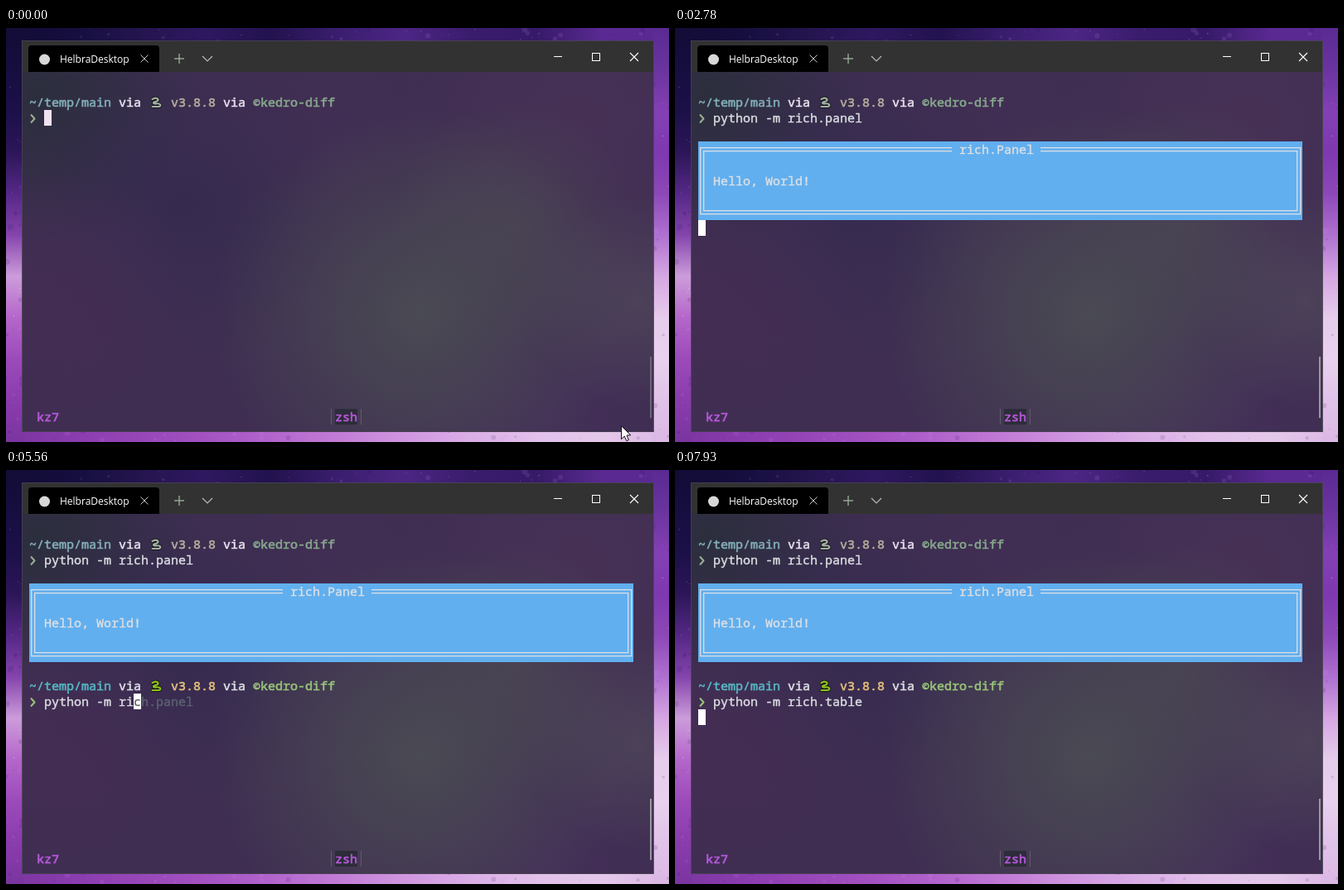
Animation, 800 px wide and 500 px high, one loop 8 s. Source, as an HTML page with a canvas:

```html
<!DOCTYPE html>
<html lang="en">
<head>
<meta charset="utf-8">
<title>Terminal session</title>
<style>
  html, body { margin: 0; width: 100%; height: 100%; overflow: hidden; background: #1a1040; }
  canvas { display: block; width: 800px; height: 500px; }
</style>
</head>
<body>
<canvas id="stage" width="800" height="500"></canvas>
<script>
const LOOP = 8000, CELL = 9, ROW = 19, LEFT = 28, TOP = 80;
const MONO = '"Noto Sans Mono", "DejaVu Sans Mono", monospace';
const UI = '"Open Sans", "Noto Sans", sans-serif';
const TEXT = '#dcdfe4', GHOST = '#5c6370';
const FADED = { dir: '#82aeb8', via: '#e9dfee', ver: '#b7ae9c', env: '#86a88c', arrow: '#98ae92', snake: '#a3b0a2' };
const VIVID = { dir: '#56b6c2', via: '#dcdfe4', ver: '#e5c07b', env: '#98c379', arrow: '#98c379', snake: '#8fbf1d' };

const ctx = document.getElementById('stage').getContext('2d');
const colX = c => LEFT + c * CELL;
const rowY = r => TOP + r * ROW;

function rect(g, x, y, w, h, color) {
  g.fillStyle = color;
  g.fillRect(x, y, w, h);
}

function line(g, color, width, ...pts) {
  g.strokeStyle = color;
  g.lineWidth = width;
  g.beginPath();
  pts.forEach(([x, y], i) => i ? g.lineTo(x, y) : g.moveTo(x, y));
  g.stroke();
}

// Text on the character grid; the thin outline gives a medium weight
function put(g, str, col, row, color, heft = 0.4) {
  g.font = `15px ${MONO}`;
  g.fillStyle = g.strokeStyle = color;
  g.lineWidth = heft;
  g.lineJoin = 'round';
  [...str].forEach((ch, i) => {
    g.fillText(ch, colX(col + i), rowY(row) + 15);
    g.strokeText(ch, colX(col + i), rowY(row) + 15);
  });
}

function block(col, row, color = '#ffffff') {
  rect(ctx, colX(col), rowY(row), CELL, ROW, color);
}

function seeded(seed) {
  return () => (seed = (seed * 16807) % 2147483647) / 2147483647;
}

function strip(g, x, y, w, h, colors) {
  const grad = w > h ? g.createLinearGradient(x, 0, x + w, 0) : g.createLinearGradient(0, y, 0, y + h);
  colors.forEach((c, i) => grad.addColorStop(i / (colors.length - 1), c));
  rect(g, x, y, w, h, grad);
}

function glow(g, x, y, r, rgb, alpha) {
  const grad = g.createRadialGradient(x, y, 0, x, y, r);
  grad.addColorStop(0, `rgba(${rgb},${alpha})`);
  grad.addColorStop(0.5, `rgba(${rgb},${alpha * 0.55})`);
  grad.addColorStop(1, `rgba(${rgb},0)`);
  rect(g, x - r, y - r, 2 * r, 2 * r, grad);
}

function wallpaper(g) {
  strip(g, 0, 0, 800, 20, ['#120c36', '#150e3e', '#24144e', '#2e1860', '#22124e',
    '#3a1e6e', '#4c2684', '#3a1c6c', '#361a68', '#5a2a92', '#5a2a92']);
  strip(g, 0, 484, 800, 16, ['#7a35a0', '#8a3cae', '#9746b8', '#a452c2', '#b264cc',
    '#c27cd6', '#d096e0', '#daaee6', '#e2c0ea', '#e4c8ea', '#dcb8e4']);
  strip(g, 0, 0, 21, 500, ['#120c36', '#170e40', '#1c1048', '#2c1658', '#552886',
    '#8444ac', '#cc9cda', '#b466ca', '#9c4aba', '#8a3cac', '#7a35a0']);
  strip(g, 780, 0, 20, 500, ['#5a2a92', '#6a34a0', '#8340b4', '#7e38b0', '#8c48b8',
    '#ae70d0', '#d6a6e2', '#e6ccec', '#e8d0ee', '#e0c2e8', '#dcb8e4']);
  const rnd = seeded(77);
  for (let i = 0; i < 700; i++) {
    const x = rnd() * 800, y = rnd() * 500, r = 0.5 + rnd() * 3.2;
    g.fillStyle = rnd() < 0.5 ? 'rgba(40,10,90,.13)' : 'rgba(215,150,245,.13)';
    g.beginPath();
    g.arc(x, y, r, 0, 7);
    g.fill();
  }
  for (let i = 0; i < 260; i++) {
    rect(g, rnd() * 800, rnd() * 500, 1, 1, `rgba(240,205,255,${0.2 + rnd() * 0.5})`);
  }
}

function acrylic(g) {
  g.save();
  g.beginPath();
  g.rect(20, 53, 761, 435);
  g.clip();
  rect(g, 20, 53, 761, 435, '#3f2e52');
  glow(g, 40, 80, 190, '42,46,60', 0.95);
  glow(g, 215, 215, 190, '50,42,78', 0.7);
  glow(g, 70, 345, 170, '72,44,84', 0.6);
  glow(g, 400, 110, 130, '68,46,86', 0.4);
  glow(g, 690, 110, 230, '72,50,86', 0.8);
  glow(g, 640, 470, 170, '70,46,92', 0.7);
  glow(g, 760, 330, 130, '82,74,92', 0.7);
  glow(g, 500, 345, 250, '75,77,83', 0.9);
  glow(g, 610, 240, 150, '76,75,84', 0.55);
  g.restore();
}

function titleBar(g) {
  rect(g, 20, 16, 761, 37, '#323232');
  g.fillStyle = '#000';
  g.beginPath();
  g.moveTo(27, 53);
  g.lineTo(27, 25);
  g.quadraticCurveTo(27, 21, 31, 21);
  g.lineTo(181, 21);
  g.quadraticCurveTo(185, 21, 185, 25);
  g.lineTo(185, 53);
  g.fill();
  g.fillStyle = '#d8d8d8';
  g.beginPath();
  g.arc(46.5, 38, 6.5, 0, 7);
  g.fill();
  g.font = `12px ${UI}`;
  g.fillStyle = '#fff';
  g.fillText('HelbraDesktop', 65, 42);
  line(g, '#c8c8c8', 1, [162.5, 32.5], [171.5, 41.5]);
  line(g, '#c8c8c8', 1, [171.5, 32.5], [162.5, 41.5]);
  line(g, '#9db39d', 1.3, [203, 37], [215, 37]);
  line(g, '#9db39d', 1.3, [209, 31], [209, 43]);
  line(g, '#b8bcb8', 1.2, [237, 34], [243, 40], [249, 34]);
  line(g, '#fff', 1, [661, 34.5], [671, 34.5]);
  g.strokeRect(707.5, 30.5, 9, 9);
  line(g, '#fff', 1.1, [753, 30], [763, 40]);
  line(g, '#fff', 1.1, [763, 30], [753, 40]);
}

function statusBar(g) {
  rect(g, 397, 460, 27, 19, '#2d2c3a');
  put(g, 'kz7', 1, 20, '#b458d8', 0.7);
  put(g, 'zsh', 41, 20, '#b458d8', 0.7);
  rect(g, 392, 460, 1, 19, '#665870');
  rect(g, 428, 460, 1, 19, '#665870');
}

function snake(g, x, y, color) {
  g.save();
  g.translate(x, y);
  g.lineCap = g.lineJoin = 'round';
  for (const [ink, width] of [['#16161c', 4], [color, 2.2]]) {
    g.strokeStyle = ink;
    g.lineWidth = width;
    g.beginPath();
    g.moveTo(4.5, 6);
    g.lineTo(8, 4.6);
    g.bezierCurveTo(12.5, 4.6, 12.5, 8, 9, 8.8);
    g.bezierCurveTo(5, 9.4, 5, 11.6, 9, 11.4);
    g.bezierCurveTo(15.5, 10.6, 15.5, 15, 12, 15);
    g.lineTo(4.5, 15);
    g.stroke();
  }
  g.restore();
}

function prompt(g, row, c) {
  const y = rowY(row);
  put(g, '~/temp/main', 0, row, c.dir, 0.6);
  put(g, 'via', 12, row, c.via, 0.6);
  snake(g, colX(16), y, c.snake);
  put(g, 'v3.8.8', 19, row, c.ver, 0.6);
  put(g, 'via', 26, row, c.via, 0.6);
  put(g, '©kedro-diff', 30, row, c.env, 0.6);
  line(g, c.arrow, 2, [30, y + 24.5], [34.5, y + 29.5], [30, y + 34.5]);
}

function panel() {
  const edge = 1.3, ink = '#dcdfe4';
  rect(ctx, 28, 137, 729, 95, '#61afef');
  for (const d of [0, 4]) {
    const x = 30 + d, y = 144 + d, r = 754 - d, b = 224 - d;
    rect(ctx, x, y, 334 - x, edge, ink);
    rect(ctx, 441, y, r - 441 + edge, edge, ink);
    rect(ctx, x, b, r - x + edge, edge, ink);
    rect(ctx, x, y, edge, b - y, ink);
    rect(ctx, r, y, edge, b - y, ink);
  }
  put(ctx, 'rich.Panel', 35, 3, ink);
  put(ctx, 'Hello, World!', 2, 5, ink);
}

function pointer() {
  ctx.beginPath();
  [[742.5, 480.5], [742.5, 496.5], [746.3, 493], [748.8, 498.6], [751.4, 497.5], [749, 492], [753.8, 491.8]]
    .forEach(([x, y]) => ctx.lineTo(x, y));
  ctx.closePath();
  ctx.fillStyle = '#fff';
  ctx.fill();
  ctx.strokeStyle = '#111';
  ctx.lineWidth = 1;
  ctx.stroke();
}

// Key presses of the second command: [time, typed, suggestion]
const first = 'python -m rich.panel', stem = 'python -m rich';
const keys = [[2860, '', '']];
[3960, 4110, 4200, 4340, 4410, 4490, 4660, 4810, 5030, 5190, 5510, 5560, 5740, 5880]
  .forEach((t, i) => keys.push([t, first.slice(0, i + 1), first.slice(i + 1)]));
keys.push(
  [6040, stem + ' ', '--help'],
  [6440, stem, '.panel'],
  [6750, stem + '.', 'panel'],
  [7070, stem + '.t', 'ree'],
  [7220, stem + '.ta', ''],
  [7370, stem + '.tab', ''],
  [7540, stem + '.tabl', ''],
  [7620, stem + '.table', '']
);

function firstCommand(t) {
  const cmd = t < 1070 ? '' : t < 1920 ? 'clear' : first;
  const editing = t < 2630;
  if (editing) block(2, 1, '#f2e2f0');
  put(ctx, cmd, 2, 1, TEXT);
  if (editing) put(ctx, cmd.slice(0, 1), 2, 1, '#3a3048');
  else if (t < 2700) block(0, 2);
  else if (t < 2780) block(0, 3);
}

function secondCommand(t) {
  const [, typed, hint] = keys.filter(k => k[0] <= t).pop();
  const col = 2 + typed.length;
  prompt(ctx, 9, VIVID);
  put(ctx, typed, 2, 10, TEXT);
  if (t >= 7930) return block(0, 11);
  block(col, 10);
  put(ctx, hint, col, 10, GHOST);
}

const scene = document.createElement('canvas');
scene.width = 800;
scene.height = 500;
const still = scene.getContext('2d');
wallpaper(still);
acrylic(still);
titleBar(still);
still.strokeStyle = 'rgba(74,68,82,.9)';
still.lineWidth = 1;
still.strokeRect(19.5, 15.5, 762, 472);
prompt(still, 0, FADED);
statusBar(still);

function draw(t) {
  ctx.drawImage(scene, 0, 0);
  rect(ctx, 777, 397, 2, 74, t < 550 ? '#6c6474' : t < 610 ? '#837d89' : '#9a969e');
  firstCommand(t);
  if (t >= 2780) panel();
  if (t >= 2780 && t < 2860) block(0, 8);
  if (t >= 2860) secondCommand(t);
  if (t < 80) pointer();
}

let start;
function tick(now) {
  start ??= now;
  draw((now - start) % LOOP);
  requestAnimationFrame(tick);
}
draw(0);
requestAnimationFrame(tick);
</script>
</body>
</html>
```
